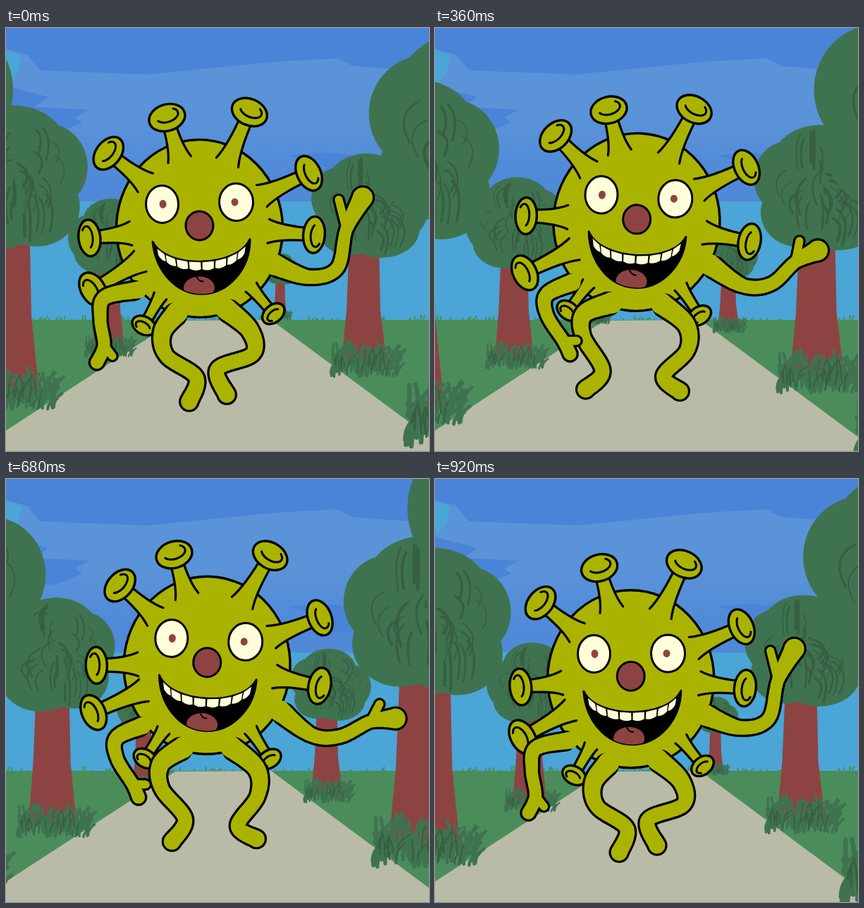
Animation, 600 px wide and 600 px high, one loop 0.96 s. Source, as an HTML page with a canvas:

```html
<!DOCTYPE html>
<html lang="en">
<head>
<meta charset="utf-8">
<title>Walk in the park</title>
<style>
html, body { margin: 0; width: 100%; height: 100%; overflow: hidden; }
canvas { display: block; width: 600px; height: 600px; }
</style>
</head>
<body>
<canvas id="stage" width="600" height="600"></canvas>
<script>
const ctx = document.getElementById('stage').getContext('2d');
const TAU = Math.PI * 2, DEG = Math.PI / 180;
const LOOP = 960, STEP = 40, STRIDE = 480;
const INK = '#000', SKIN = '#aab400', RED = '#8e4343', CREAM = '#fffedb';
const LEAF = '#3f7350', LEAF_DARK = '#385f42', GRASS = '#4a8d5b', PATH = '#b9bba6';
const SKY = '#5a93d8', SKY_DARK = '#4a84d8', SKY_LOW = '#4ba5d6';

const mod = (a, n) => ((a % n) + n) % n;
const mix = (a, b, f) => a + (b - a) * f;
const wave = (t, peak, period) => Math.cos((t - peak) / period * TAU);

function random(seed) {
  return () => {
    seed = (seed * 1664525 + 1013904223) >>> 0;
    return seed / 4294967296;
  };
}

function shape(color, points) {
  ctx.fillStyle = color;
  ctx.beginPath();
  points.forEach(([x, y]) => ctx.lineTo(x, y));
  ctx.fill();
}

function oval(x, y, rx, ry, fill, line) {
  ctx.beginPath();
  ctx.ellipse(x, y, rx, ry, 0, 0, TAU);
  ctx.fillStyle = fill;
  ctx.fill();
  if (line) {
    ctx.lineWidth = line;
    ctx.strokeStyle = INK;
    ctx.stroke();
  }
}

function blades(rand, count, x, y, width, depth, height, color, line) {
  ctx.strokeStyle = color;
  ctx.lineWidth = line;
  ctx.beginPath();
  for (let i = 0; i < count; i++) {
    const bx = x + rand() * width, by = y + rand() * depth;
    const tip = height * (.4 + .6 * rand()), lean = (rand() - .3) * height * .6;
    ctx.moveTo(bx, by);
    ctx.quadraticCurveTo(bx, by - tip * .6, bx + lean, by - tip);
  }
  ctx.stroke();
}

// ---------- Scenery ----------
function scenery() {
  ctx.fillStyle = SKY;
  ctx.fillRect(0, 0, 600, 600);
  const shade = ctx.createLinearGradient(0, 130, 0, 215);
  shade.addColorStop(0, SKY);
  shade.addColorStop(1, '#4f89d8');
  ctx.fillStyle = shade;
  ctx.fillRect(0, 130, 600, 116);
  shape(SKY_DARK, [[0, 0], [600, 0], [600, 62], [492, 54], [470, 43], [380, 48],
    [200, 66], [48, 60], [30, 38], [0, 30]]);
  shape(SKY_DARK, [[0, 82], [60, 98], [40, 112], [118, 116], [98, 127], [108, 134], [70, 150], [0, 150]]);
  shape(SKY_DARK, [[400, 181], [450, 177], [600, 188], [600, 225], [440, 215], [455, 197]]);
  shape(SKY_LOW, [[0, 30], [22, 40], [17, 62], [0, 84]]);
  ctx.fillStyle = SKY_LOW;
  ctx.fillRect(0, 246, 600, 170);
  ctx.fillStyle = GRASS;
  ctx.fillRect(0, 414, 600, 186);
  blades(random(5), 80, 0, 416, 600, 2, 9, GRASS, 1.8);
  shape(PATH, [[240, 415], [376, 414], [600, 580], [600, 600], [0, 600], [0, 571]]);
}

// One row of trees on each side, scaled about its own vanishing point.
const ROWS = [
  { eye: [298, 385], size: u => 1.207 - .64 * u + .06 * u * u, flip: 1,
    x: -244, base: 36, top: 25, foot: 110, crown: [-243, -143, 92, 85] },
  { eye: [338, 380], size: u => 1 - .78 * u + .08 * u * u, flip: -1,
    x: 170, base: 32, top: 21, foot: 95, crown: [178, -128, 83, 74] }
];
const LOBES = [[.05, -.42, .68, .58], [.48, -.15, .52, .6], [-.48, .05, .52, .62], [.35, .4, .55, .55], [-.2, .45, .65, .55]];

function tree(row, u) {
  const s = row.size(u);
  if (s < .08) return;
  const { x, base, top, foot, flip } = row, [cx, cy, rx, ry] = row.crown;
  const rand = random(17);
  ctx.save();
  ctx.translate(...row.eye);
  ctx.scale(s, s);
  shape(RED, [[x - top, -75], [x + top, -75], [x + top + 2, 20], [x + base, foot],
    [x - base, foot], [x - top - 4, 20]]);
  blades(rand, 110, x - base * 1.5, foot - 4, base * 3, 24, 30, LEAF, 3.5);
  blades(rand, 26, x - base * 1.4, foot, base * 2.8, 18, 26, LEAF_DARK, 1.6);
  for (const [lx, ly, lw, lh] of LOBES) oval(cx + flip * lx * rx, cy + ly * ry, lw * rx, lh * ry, LEAF);
  // Long brush marks that bulge away from the middle of the crown.
  ctx.strokeStyle = LEAF_DARK;
  for (let i = 0; i < 40; i++) {
    const a = rand() * TAU, d = Math.sqrt(rand()) * .72;
    const px = cx + Math.cos(a) * d * rx, py = cy + Math.sin(a) * d * ry;
    const bulge = Math.cos(a) * 16 - 4 * flip, h = 10 + rand() * 12;
    ctx.lineWidth = 1 + rand() * 2.5;
    ctx.beginPath();
    ctx.moveTo(px - bulge * .6, py - h);
    ctx.quadraticCurveTo(px + bulge, py - h * .4, px, py + h);
    ctx.stroke();
  }
  ctx.restore();
}

// ---------- Character ----------
const CENTER = [281.5, 270];

function bob(t) {
  return {
    dx: -8.5 * wave(t, 45, STRIDE),
    dy: 10.5 * wave(t, -10, STRIDE),
    tilt: 1.2 - 3.4 * wave(t, 45, STRIDE)
  };
}

// Rest angle, reach and the moment of the widest swing, clockwise from the upper left.
const SPIKES = [
  [221, 165, 320], [253, 160, 130], [296, 176, 660], [-25.5, 172, 800], [8, 163, 550],
  [177, 157, 400], [152, 176, 600], [122, 162, 350], [53.5, 163, 540]
];

function spike([rest, reach, peak], tilt, t) {
  const angle = (rest + tilt * .8 + 2.4 * wave(t, peak, LOOP)) * DEG;
  const small = rest > 50 && rest < 130, size = small ? .68 : 1;
  const length = reach - (small ? 114 : 98), root = small ? 10 : 17, neck = small ? 7 : 9;
  const side = k => {
    ctx.moveTo(-length, k * root);
    ctx.quadraticCurveTo(-length * .7, k * neck, -4, k * neck);
  };
  ctx.save();
  ctx.rotate(angle);
  ctx.translate(reach, 0);
  ctx.beginPath();
  side(1);
  ctx.lineTo(-4, -neck);
  ctx.quadraticCurveTo(-length * .7, -neck, -length, -root);
  ctx.fillStyle = SKIN;
  ctx.fill();
  ctx.beginPath();
  side(1);
  side(-1);
  ctx.strokeStyle = INK;
  ctx.lineWidth = 3.2;
  ctx.stroke();
  const depth = (15 + 4 * Math.abs(Math.sin(angle))) * size;
  oval(0, 0, depth, 26 * size, SKIN, 3.4);
  ctx.lineWidth = 3;
  ctx.beginPath();
  ctx.ellipse(3 * size, size, depth * .5, 16 * size, 0, TAU * .12, TAU * .68);
  ctx.stroke();
  ctx.restore();
}

// Each limb swings between two poses, joints listed from the body outwards.
// follow: how much of the body's bob is lost per joint; skew: above 1 the swing starts late
const LEG = { follow: .15, radii: [17, 14, 12, 12, 13.5] };
const LIMBS = {
  rightLeg: { ...LEG, skew: 1.35,
    rest: [[319, 388], [352, 420], [355, 455], [304, 478], [316, 516]],
    swung: [[314, 390], [353, 420], [354, 457], [333, 502], [364, 514]] },
  leftLeg: { ...LEG, skew: .95,
    rest: [[250, 393], [228, 423], [233, 458], [274, 490], [263, 526]],
    swung: [[246, 388], [206, 403], [205, 435], [232, 485], [208, 511]] },
  leftArm: { follow: 0, skew: 1.2, radii: [14, 12, 10.5, 10.5, 11],
    rest: [[195, 361], [147, 372], [141, 403], [146, 440], [136, 464]], thumbRest: [158, 455],
    swung: [[188, 359], [156, 379], [159, 407], [189, 444], [205, 460]], thumbSwung: [210, 438] },
  rightArm: { follow: 0, skew: 1.4, radii: [17, 11.5, 11, 10.5, 16],
    rest: [[387, 325], [437, 343], [477, 330], [490, 275], [513, 230]], thumbRest: [479, 233],
    swung: [[384, 342], [429, 380], [469, 385], [519, 372], [557, 377]], thumbSwung: [537, 351] }
};

// Tapered curve through the joints as a row of discs [x, y, radius].
function tube(joints, radii) {
  const row = [], last = joints.length - 1;
  const joint = k => joints[Math.max(0, Math.min(last, k))];
  for (let i = 0; i < last; i++) {
    for (let k = 0; k < 32; k++) {
      const f = k / 32;
      const [x, y] = [0, 1].map(c => {
        const [a, b, d, e] = [-1, 0, 1, 2].map(o => joint(i + o)[c]);
        return b + f * ((d - a) + f * ((2 * a - 5 * b + 4 * d - e) + f * (3 * b - a - 3 * d + e))) / 2;
      });
      row.push([x, y, mix(radii[i], radii[i + 1], f)]);
    }
  }
  return [...row, [...joints[last], radii[last]]];
}

function discs(row, grow, color) {
  ctx.fillStyle = color;
  ctx.beginPath();
  for (const [x, y, r] of row) {
    ctx.moveTo(x + r + grow, y);
    ctx.arc(x, y, r + grow, 0, TAU);
  }
  ctx.fill();
}

function limb({ rest, swung, thumbRest, thumbSwung, radii, follow, skew }, { dx, dy }, t) {
  const swing = Math.sin(Math.PI * (mod(t + 20, LOOP) / LOOP) ** skew) ** 2;
  const place = (a, b, hold) => [mix(a[0], b[0], swing) + dx * hold, mix(a[1], b[1], swing) + dy * hold];
  const joints = rest.map((a, i) => place(a, swung[i], 1 - follow * i));
  const parts = [tube(joints, radii)];
  if (thumbRest) parts.push(tube([joints[3], place(thumbRest, thumbSwung, 1)], [8, 7.5]));
  // The ink starts a little later than the skin, so the root stays open.
  parts.forEach(p => discs(p.slice(6), 1.3, INK));
  parts.forEach(p => discs(p, -1.9, SKIN));
}

// Upper lip, corner to corner, for f from 0 to 1.
const lip = f => {
  const g = 1 - f;
  return [-67 * g ** 3 - 144 * g * g * f + 156 * g * f * f + 71 * f ** 3, 21 + 120 * f * g];
};

function mouth() {
  ctx.beginPath();
  ctx.moveTo(-67, 21);
  ctx.bezierCurveTo(-64, 62, -36, 97, 2, 97);
  ctx.bezierCurveTo(38, 97, 70, 64, 71, 21);
  ctx.bezierCurveTo(52, 61, -48, 61, -67, 21);
  ctx.closePath();
  ctx.fillStyle = INK;
  ctx.fill();
  ctx.lineWidth = 3;
  ctx.stroke();
  ctx.save();
  ctx.clip();
  oval(-3, 88, 22, 16, RED);
  ctx.lineWidth = 2;
  ctx.beginPath();
  ctx.moveTo(-6, 73);
  ctx.quadraticCurveTo(-2, 80, 3, 79);
  ctx.stroke();
  ctx.restore();
  ctx.fillStyle = CREAM;
  for (let i = 0; i < 8; i++) {
    const a = lip(.08 + i * .106), b = lip(.172 + i * .106), lean = (3.5 - i) * .5;
    ctx.beginPath();
    ctx.moveTo(a[0], a[1] + 1);
    ctx.lineTo(b[0], b[1] + 1);
    ctx.lineTo(b[0] + lean, b[1] + 11);
    ctx.quadraticCurveTo((a[0] + b[0]) / 2 + lean, (a[1] + b[1]) / 2 + 15, a[0] + lean, a[1] + 11);
    ctx.fill();
  }
}

function face() {
  oval(-52, -32, 23, 26.5, CREAM, 3);
  oval(53, -32, 24, 26.5, CREAM, 3);
  oval(-51, -32, 5, 6, RED);
  oval(51, -32, 5, 5.5, RED);
  oval(0, 0, 19.5, 20.5, RED, 3);
  mouth();
}

function atBody({ dx, dy }, angle, draw) {
  ctx.save();
  ctx.translate(CENTER[0] + dx, CENTER[1] + dy);
  ctx.rotate(angle * DEG);
  draw();
  ctx.restore();
}

function character(t) {
  const body = bob(t);
  atBody(body, body.tilt, () => oval(0, 4, 118, 126, SKIN, 3.4));
  atBody(body, 0, () => SPIKES.forEach(s => spike(s, body.tilt, t)));
  Object.values(LIMBS).forEach(l => limb(l, body, t));
  atBody(body, body.tilt, face);
}

function render(time) {
  const t = Math.floor(mod(time, LOOP) / STEP) * STEP;
  const phase = mod(t, STRIDE) / STRIDE;
  ctx.lineCap = ctx.lineJoin = 'round';
  scenery();
  for (let n = 2; n >= -2; n--) ROWS.forEach(row => tree(row, n + phase));
  character(t);
}

let start;
function tick(now) {
  start ??= now;
  render(now - start);
  requestAnimationFrame(tick);
}
render(0);
requestAnimationFrame(tick);
</script>
</body>
</html>
```
